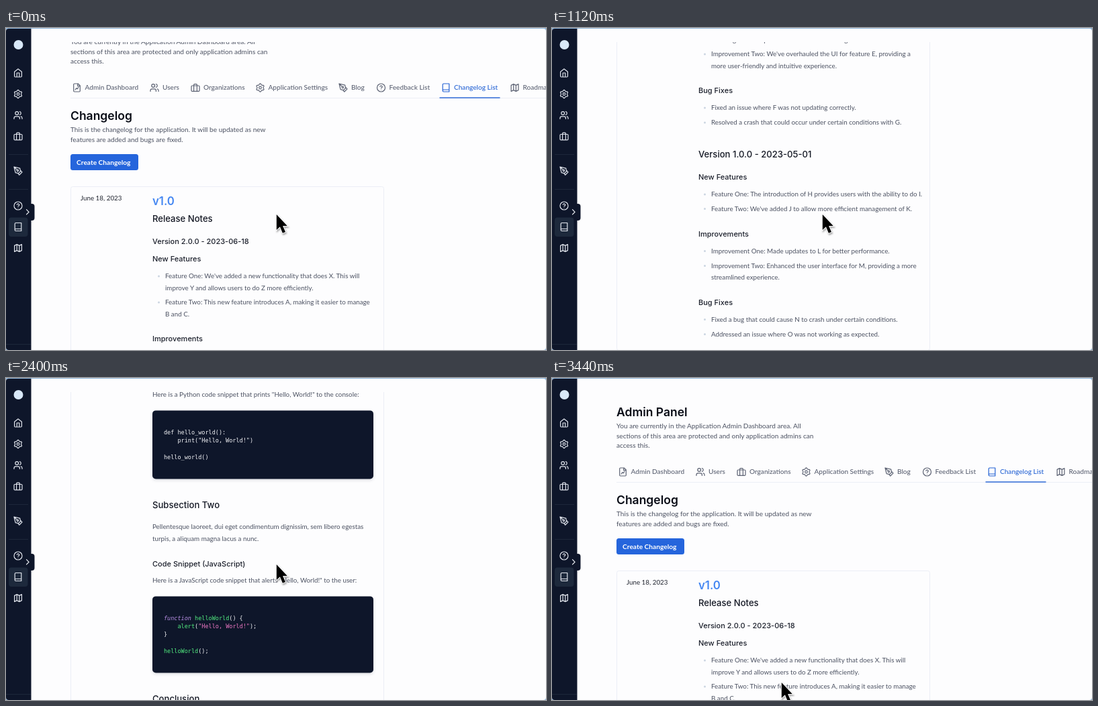
Recreate the animation shown at these times as an HTML page. Size 804 by 480 pixels, loop 3.46 s.

```html
<!DOCTYPE html>
<html lang="en">
<head>
<meta charset="utf-8">
<title>Changelog</title>
<style>
html, body { margin: 0; width: 100%; height: 100%; overflow: hidden; background: #8fb6dc; }
svg { display: block; }
text { font: 9.8px Lato, sans-serif; fill: #4c5262; white-space: pre; }
.title { font: 600 17.5px Inter, sans-serif; fill: #090c16; }
.version { font: 600 16.8px Inter, sans-serif; fill: #4688f2; }
.h2 { font: 500 13.1px Inter, sans-serif; fill: #141824; }
.h3 { font: 500 11px Inter, sans-serif; fill: #1c202c; }
.lead { font-size: 10.1px; }
.tab { font-size: 10.1px; font-weight: 500; fill: #5c6273; }
.date { fill: #20242f; }
.active { fill: #2563d4; }
.button { font-size: 10.2px; font-weight: 700; fill: #fff; }
.code { font: 8.5px "DejaVu Sans Mono", monospace; fill: #f4f5f8; }
.keyword { fill: #b78fe4; font-style: italic; }
.name { fill: #52ee80; }
.string { fill: #ee78c4; }
.icon { fill: none; stroke-width: 2; stroke-linecap: round; stroke-linejoin: round; }
.line { fill: none; stroke: #eceef6; }
.block { fill: #0e162a; filter: drop-shadow(0 2px 2px #0f172a22); }
</style>
</head>
<body>
<svg width="804" height="480" viewBox="0 0 804 480">
  <clipPath id="view"><rect x="38" y="21" width="766" height="459"/></clipPath>
  <rect y="1" width="804" height="479" rx="4" fill="#fdfdfe"/>
  <g clip-path="url(#view)"><g id="page"></g></g>
  <g id="sidebar"></g>
  <path id="cursor" d="M.8 1V24l5.1-4.7 4 9.4 4.1-1.8-3.9-9h6.7z" stroke="#fff" stroke-width="2"
    paint-order="stroke" style="filter:drop-shadow(1px 2px 1px #0005)"/>
</svg>
<script>
const $ = id => document.getElementById(id);

// A cog outline: six soft lobes around the centre.
const cog = 'M' + Array.from({ length: 60 }, (_, i) => {
  const a = i * Math.PI / 30, r = 8.8 + 1.4 * Math.cos(6 * a);
  return `${(12 + r * Math.sin(a)).toFixed(1)} ${(12 - r * Math.cos(a)).toFixed(1)}`;
}).join('L') + 'z';
const ring = (x, y, r) => `M${x + r} ${y}a${r} ${r} 0 1 1 ${-2 * r} 0a${r} ${r} 0 1 1 ${2 * r} 0`;

const icons = {
  home: 'M3 9l9-7 9 7v11a2 2 0 0 1-2 2H5a2 2 0 0 1-2-2zM9 22V12h6v10',
  cog: cog + ring(12, 12, 3),
  users: 'M16 21v-2a4 4 0 0 0-4-4H6a4 4 0 0 0-4 4v2M22 21v-2a4 4 0 0 0-3-3.9M16 3.1a4 4 0 0 1 0 7.8' + ring(9, 7, 4),
  case: 'M4 7h16a2 2 0 0 1 2 2v10a2 2 0 0 1-2 2H4a2 2 0 0 1-2-2V9a2 2 0 0 1 2-2M8 21V5a2 2 0 0 1 2-2h4a2 2 0 0 1 2 2v16',
  pen: 'M12 19l7-7 3 3-7 7zM18 13l-1.5-7.5L2 2l3.5 14.5L13 18zM2 2l7.6 7.6' + ring(11, 11, 2),
  help: ring(12, 12, 10) + 'M9.1 9a3 3 0 0 1 5.8 1c0 2-3 3-3 3M12 17h.01',
  book: 'M4 19.5v-15A2.5 2.5 0 0 1 6.5 2H20v20H6.5a2.5 2.5 0 0 1 0-5H20',
  map: 'M3 6l6-3 6 3 6-3v15l-6 3-6-3-6 3zM9 3v15M15 6v15',
  file: 'M15 2H6a2 2 0 0 0-2 2v16a2 2 0 0 0 2 2h12a2 2 0 0 0 2-2V7zM14 2v6h6M8 17l3-4 2 2 3-4',
  chevron: 'M9 18l6-6-6-6'
};

const icon = (name, x, y, color) =>
  `<path class="icon" stroke="${color}" transform="translate(${x - 7.2} ${y - 7.2}) scale(.6)" d="${icons[name]}"/>`;
const rect = (x, y, w, h, r, attrs) =>
  `<rect x="${x}" y="${y}" width="${w}" height="${h}" rx="${r}" ${attrs}/>`;

// Text is placed by the middle of its line.
const drop = { title: 6.4, version: 6.2, h2: 4.8, h3: 4 };
const text = (x, y, cls, str) =>
  `<text x="${x}" y="${y + (drop[cls] || 3.4)}" class="${cls}">${str}</text>`;
const lines = (x, y, step, cls, ...rows) =>
  rows.map((row, i) => text(x, y + i * step, cls, row)).join('');

const h2 = (y, str) => text(218, y, 'h2', str);
const h3 = (y, str) => text(218, y, 'h3', str);
const para = (y, ...rows) => lines(218, y, 17.1, 'body', ...rows);
const item = (y, ...rows) =>
  `<circle cx="227.5" cy="${y}" r="1.5" fill="#cbd5e1"/>` + lines(237, y, 17.1, 'body', ...rows);
const code = (y, h, ...rows) =>
  rect(218, y, 329, h, 5, 'class="block"') + lines(235, y + 32, 12.3, 'code', ...rows);
const card = (y, h, version) =>
  rect(96.5, y + .5, 466, h, 3, 'class="line"') +
  text(111, y + 18, 'date', 'June 18, 2023') + text(218, y + 22, 'version', version);
const span = (cls, str) => `<tspan class="${cls}">${str}</tspan>`;

const tabs = [
  ['file', 105.5, 117.5, 'Admin Dashboard'], ['users', 221, 233, 'Users'],
  ['case', 282, 294, 'Organizations'], ['cog', 378.5, 390.5, 'Application Settings'],
  ['pen', 502, 514, 'Blog'], ['help', 558.5, 570.5, 'Feedback List'],
  ['book', 655, 667, 'Changelog List'], ['map', 757.5, 769.5, 'Roadmap']
];

$('page').innerHTML = [
  text(96, 51, 'title', 'Admin Panel'),
  lines(96, 72, 14.5, 'lead',
    'You are currently in the Application Admin Dashboard area. All',
    'sections of this area are protected and only application admins can',
    'access this.'),
  '<path class="line" d="M96 155.5H804"/><path stroke="#2f6ad6" stroke-width="1.4" d="M645.5 155H735.5"/>',
  ...tabs.map(([name, ix, tx, label]) => {
    const on = name === 'book';
    return icon(name, ix, 140, on ? '#2563d4' : '#5c6273') + text(tx, 140, on ? 'tab active' : 'tab', label);
  }),
  text(96, 182, 'title', 'Changelog'),
  lines(96, 203, 14.5, 'lead',
    'This is the changelog for the application. It will be updated as new',
    'features are added and bugs are fixed.'),
  rect(96, 239, 101, 24, 3.5, 'fill="#2565dc"'),
  text(105, 251.3, 'button', 'Create Changelog'),

  card(287, 733, 'v1.0'),
  h2(335, 'Release Notes'),
  h3(368.5, 'Version 2.0.0 - 2023-06-18'),
  h3(395, 'New Features'),
  item(421, 'Feature One: We\'ve added a new functionality that does X. This will',
    'improve Y and allows users to do Z more efficiently.'),
  item(460, 'Feature Two: This new feature introduces A, making it easier to manage', 'B and C.'),
  h3(514, 'Improvements'),
  item(540, 'Improvement One: Enhancements have been made to existing feature D,',
    'resulting in better performance and reduced lag.'),
  item(579, 'Improvement Two: We\'ve overhauled the UI for feature E, providing a',
    'more user-friendly and intuitive experience.'),
  h3(633, 'Bug Fixes'),
  item(659, 'Fixed an issue where F was not updating correctly.'),
  item(681, 'Resolved a crash that could occur under certain conditions with G.'),
  h2(728, 'Version 1.0.0 - 2023-05-01'),
  h3(762, 'New Features'),
  item(788, 'Feature One: The introduction of H provides users with the ability to do I.'),
  item(809.5, 'Feature Two: We\'ve added J to allow more efficient management of K.'),
  h3(847, 'Improvements'),
  item(872.5, 'Improvement One: Made updates to L for better performance.'),
  item(894.5, 'Improvement Two: Enhanced the user interface for M, providing a more',
    'streamlined experience.'),
  h3(949, 'Bug Fixes'),
  item(974.5, 'Fixed a bug that could cause N to crash under certain conditions.'),
  item(996.5, 'Addressed an issue where O was not working as expected.'),

  card(1029.5, 900, 'v0.8'),
  h2(1077.5, 'Lorem Ipsum'),
  para(1110, 'Lorem ipsum dolor sit amet, consectetur adipiscing elit. Morbi bibendum,',
    'sapien ac facilisis vehicula, mi turpis feugiat dui, eget pharetra nunc nisi ac', 'massa.'),
  h2(1191, 'Subsection One'),
  para(1224, 'Nulla eget mollis lectus, at condimentum purus. Integer id est nec ante',
    'venenatis ultrices sed sed lorem.'),
  h3(1278.5, 'Code Snippet (Python)'),
  para(1304, 'Here is a Python code snippet that prints "Hello, World!" to the console:'),
  code(1327.4, 102, 'def hello_world():', '    print("Hello, World!")', '', 'hello_world()'),
  h2(1468, 'Subsection Two'),
  para(1501, 'Pellentesque laoreet, dui eget condimentum dignissim, sem libero egestas',
    'turpis, a aliquam magna lacus a nunc.'),
  h3(1556, 'Code Snippet (JavaScript)'),
  para(1581, 'Here is a JavaScript code snippet that alerts "Hello, World!" to the user:'),
  code(1604.4, 114,
    span('keyword', 'function') + ' ' + span('name', 'helloWorld') + '() {',
    '    ' + span('name', 'alert') + '(' + span('string', '"Hello, World!"') + ');',
    '}', '', span('name', 'helloWorld') + '();'),
  h2(1757, 'Conclusion')
].join('');

const dark = 'fill="#0e162a"';
$('sidebar').innerHTML =
  `<path ${dark} d="M4 1H37.5V480H4a4 4 0 0 1-4-4V5a4 4 0 0 1 4-4"/>` +
  rect(24, 262, 18.5, 25, 4, dark) +
  rect(4, 282.5, 28.5, 28.5, 4, 'fill="#1d293c"') +
  '<path stroke="#1d273a" d="M4 188.5H33M4 240.5H33M0 471.5H37"/>' +
  '<circle cx="18.5" cy="25" r="7" fill="#d8e8f8"/>' +
  [['home', 67], ['cog', 98.5], ['users', 130], ['case', 161.5], ['pen', 213],
    ['help', 265], ['book', 296.5], ['map', 328]]
    .map(([name, y]) => icon(name, 18, y, '#e2e6ee')).join('') +
  icon('chevron', 32.3, 274.3, '#f1f4f9');

// Each key is [time, value]; motion eases in and out between keys.
const scrollKeys = [[0, 51], [960, 592], [1460, 366.5], [2328, 1279], [2420, 1279], [2800, 0]];
const cursorKeys = [[3060, 0], [3440, 1]];

function track(keys, t) {
  const i = keys.findIndex(key => key[0] > t);
  if (i < 0) return keys[keys.length - 1][1];
  if (i === 0) return keys[0][1];
  const [t0, v0] = keys[i - 1], [t1, v1] = keys[i];
  return v0 + (v1 - v0) * (.5 - .5 * Math.cos(Math.PI * (t - t0) / (t1 - t0)));
}

const STEP = 20; // the picture advances fifty times a second

function draw() {
  const t = Math.floor((performance.now() + 2) / STEP) * STEP % 3460;
  const move = track(cursorKeys, t);
  $('page').setAttribute('transform', `translate(0 ${-Math.round(track(scrollKeys, t))})`);
  $('cursor').setAttribute('transform', `translate(${402 - 61 * move} ${277 + 176 * move})`);
  requestAnimationFrame(draw);
}
draw();
</script>
</body>
</html>
```
